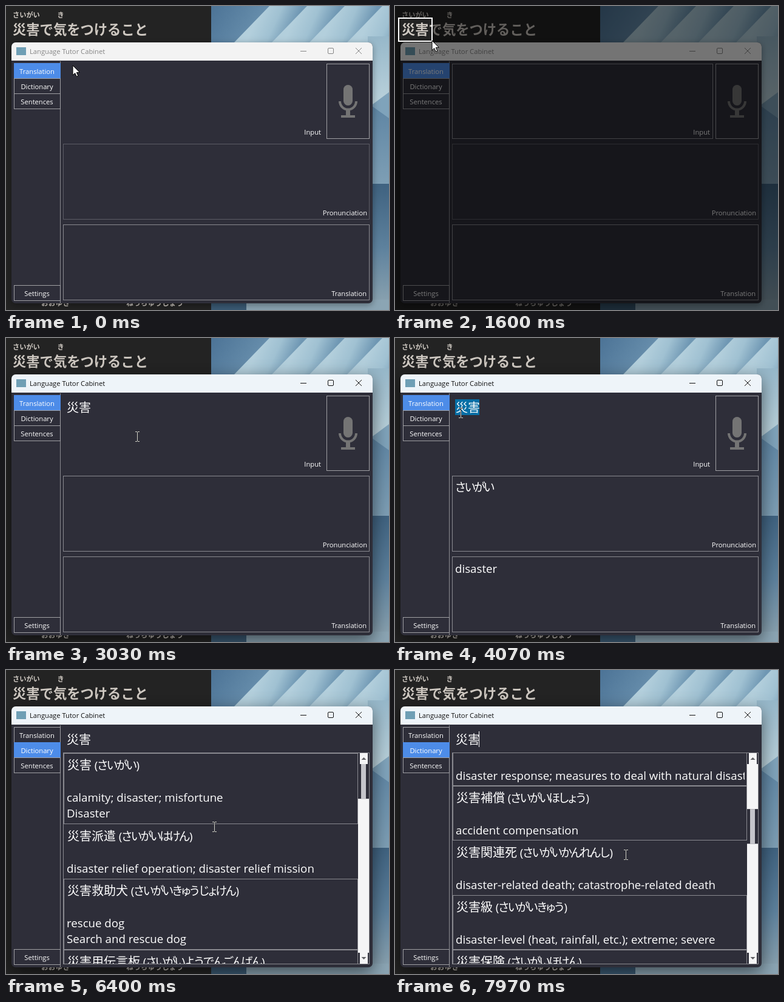
These frames come from a looping animation (631x501 px, 8000 ms). An HTML page with a canvas:

```html
<!DOCTYPE html>
<html lang="ja">
<head>
<meta charset="utf-8">
<style>
html, body { margin: 0; width: 100%; height: 100%; overflow: hidden; background: #222; }
canvas { display: block; }
</style>
</head>
<body>
<canvas id="stage" width="631" height="501"></canvas>
<script>
const ctx = document.getElementById('stage').getContext('2d');
const LOOP = 8000;
const LATIN = '"Open Sans", "Noto Sans", sans-serif';
const CJK = '"Noto Sans CJK JP", "Noto Sans CJK", sans-serif';
const PANEL = '#2e2e39', LINE = '#8a8a90', WHITE = '#fff', MIC = '#747474';

// Moments, in ms, at which the state changes
const CUE = {
  dim: 300, drag: 1130, capture: 1870, hover: 2040, activate: 2930, select: 3920,
  result: 3300, dictionary: 4880, focus: 5640, paste: 5840, list: 6000, nudge: 7320, scroll: 7630,
};

const ENTRIES = [
  ['災害 (さいがい)', 'calamity; disaster; misfortune', 'Disaster'],
  ['災害派遣 (さいがいはけん)', 'disaster relief operation; disaster relief mission'],
  ['災害救助犬 (さいがいきゅうじょけん)', 'rescue dog', 'Search and rescue dog'],
  ['災害用伝言板 (さいがいようでんごんばん)', 'emergency message board; disaster message board; computer board'],
  ['災害対応 (さいがいたいおう)', 'disaster response; measures to deal with natural disasters'],
  ['災害補償 (さいがいほしょう)', 'accident compensation'],
  ['災害関連死 (さいがいかんれんし)', 'disaster-related death; catastrophe-related death'],
  ['災害級 (さいがいきゅう)', 'disaster-level (heat, rainfall, etc.); extreme; severe'],
  ['災害保険 (さいがいほけん)', 'accident insurance'],
];

const INPUT = [94, 95, 430, 124];
const SEARCH = [94, 95, 505, 37];
const LIST = [95, 137, 485, 347];
const LIST_EXTENT = 1887, NOTCH = 50;

// Pointer gestures: start, end, destination
const MOVES = [
  { from: 100, to: 670, x: 12, y: 23 },
  { from: 1030, to: CUE.drag, x: 6, y: 20 },
  { from: CUE.drag, to: 1600, x: 61, y: 57 },
  { from: 1845, to: 2370, x: 216, y: 162 },
  { from: 3400, to: CUE.select, x: 142, y: 118 },
  { from: CUE.select, to: 4070, x: 108, y: 123 },
  { from: 4300, to: CUE.dictionary, x: 50, y: 132 },
  { from: 5000, to: 5330, x: 216, y: 162 },
  { from: 5400, to: CUE.focus, x: 216, y: 113 },
  { from: 6200, to: 6730, x: 383, y: 304 },
  { from: 6900, to: 7300, x: 383, y: 310 },
  { from: CUE.scroll, to: 7970, x: 380, y: 304 },
];

const easeOut = u => 1 - (1 - u) ** 3;

function pointerAt(t) {
  let x = 110, y = 98;
  for (const move of MOVES) {
    const u = easeOut(Math.min(1, Math.max(0, (t - move.from) / (move.to - move.from))));
    x += (move.x - x) * u;
    y += (move.y - y) * u;
  }
  return { x: Math.round(x), y: Math.round(y) };
}

function scrollAt(t) {
  if (t < CUE.nudge) return 0;
  const turns = Math.floor((t - CUE.scroll) / 48) + 1;
  return NOTCH * (1 + Math.min(8, Math.max(0, turns)));
}

const inside = (p, [x, y, w, h]) => p.x >= x && p.x < x + w && p.y >= y && p.y < y + h;

function fill(color, x, y, w, h) {
  ctx.fillStyle = color;
  ctx.fillRect(x, y, w, h);
}

function frame([x, y, w, h], color = LINE) {
  ctx.strokeStyle = color;
  ctx.lineWidth = 1;
  ctx.strokeRect(x + .5, y + .5, w - 1, h - 1);
}

function rounded(color, x, y, w, h, r) {
  ctx.beginPath();
  ctx.roundRect(x, y, w, h, r);
  ctx.fillStyle = color;
  ctx.fill();
}

function poly(color, ...pts) {
  ctx.beginPath();
  for (let i = 0; i < pts.length; i += 2) ctx.lineTo(pts[i], pts[i + 1]);
  ctx.closePath();
  ctx.fillStyle = color;
  ctx.fill();
}

function line(x0, y0, x1, y1) {
  ctx.beginPath();
  ctx.moveTo(x0, y0);
  ctx.lineTo(x1, y1);
  ctx.stroke();
}

function gradient(x0, y0, x1, y1, ...colors) {
  const g = ctx.createLinearGradient(x0, y0, x1, y1);
  colors.forEach((c, i) => g.addColorStop(i / (colors.length - 1), c));
  return g;
}

function clip([x, y, w, h], paint) {
  ctx.save();
  ctx.beginPath();
  ctx.rect(x, y, w, h);
  ctx.clip();
  paint();
  ctx.restore();
}

function label(text, x, y, color = WHITE, align = 'left', font = '11.2px ' + LATIN) {
  ctx.font = font;
  ctx.fillStyle = color;
  ctx.textAlign = align;
  ctx.fillText(text, x, y);
}

// Large text mixing Latin, kanji and tightly set kana
function mixed(text, x, y, color = WHITE) {
  for (const run of text.match(/[ぁ-ん]|[一-龠]+|[^ぁ-ん一-龠]+/g)) {
    const kana = /[ぁ-ん]/.test(run), kanji = /[一-龠]/.test(run);
    const trim = !kana ? 0 : /[っゃゅょ]/.test(run) ? 6.6 : 3.2;
    const font = kana ? '19px ' + CJK : kanji ? '20px ' + CJK : '18.7px ' + LATIN;
    label(run, x - trim / 2, y, color, 'left', font);
    x += ctx.measureText(run).width - trim;
  }
}

function drawDesktop() {
  fill(gradient(338, 0, 430, 60, '#4c7396', '#7097b3'), 338, 0, 293, 60);
  for (let i = 0; i < 4; i++) {
    const x = 434 + 62 * i;
    const tone = gradient(x - 25, 30, x + 30, 55, '#b3cfdc', '#a0c1d2', '#6f97b3');
    poly(tone, x, 0, x + 80, 0, x + 22, 60, x - 58, 60);
  }
  const side = 596, width = 35;
  fill(gradient(0, 40, 0, 165, '#93b5c8', '#bcd3dc'), side, 50, width, 115);
  fill(gradient(0, 160, 0, 293, '#5d84a3', '#7e9fb5'), side, 165, width, 128);
  poly('#7fa3bb', side, 168, 631, 142, 631, 185, side, 160);
  fill(gradient(0, 293, 0, 501, '#3f6280', '#5d819d', '#8fa6b2'), side, 293, width, 208);
  fill('#3a5a74', 338, 484, 58, 17);
  fill('#8ba5b4', 396, 484, 235, 17);

  fill('#232323', 0, 0, 338, 501);
  const ink = '#cec8c1', bold = size => `bold ${size}px ${CJK}`;
  label('さいがい', 11, 19, ink, 'left', bold(11.2));
  label('き', 90, 19, ink, 'center', bold(11.2));
  label('災害で気をつけること', 11, 47, ink, 'left', bold(22.3));
  label('おおゆき', 58, 494, ink, 'left', bold(11.8));
  label('ねっちゅうしょう', 198, 494, ink, 'left', bold(11.8));
}

function drawTitleBar(active) {
  rounded(active ? '#eef4f9' : '#f3f3f3', 9, 60, 595, 30, [7, 7, 0, 0]);
  fill('#6f9fb5', 17, 68, 16, 13);
  const ink = active ? '#111' : '#858585';
  label('Language Tutor Cabinet', 39, 79, ink);
  ctx.strokeStyle = ink;
  ctx.lineWidth = 1;
  line(485, 74.5, 495, 74.5);
  line(576, 69, 586, 79);
  line(586, 69, 576, 79);
  ctx.beginPath();
  ctx.roundRect(530.5, 69.5, 9, 9, 1.5);
  ctx.stroke();
}

function drawTab(name, y, selected) {
  const box = [13, y, 77, 26];
  if (selected) fill('#4d8ce8', ...box);
  else frame(box, '#a0a0a4');
  label(name, 51, y + 18, WHITE, 'center');
}

function drawWindow(active, page) {
  ctx.save();
  ctx.shadowColor = active ? 'rgba(0,0,0,.55)' : 'rgba(0,0,0,.35)';
  ctx.shadowBlur = active ? 28 : 12;
  ctx.shadowOffsetY = active ? 8 : 3;
  rounded(PANEL, 9, 60, 595, 430, 7);
  ctx.restore();
  drawTitleBar(active);
  ctx.strokeStyle = LINE;
  line(89.5, 91, 89.5, 490);
  ['Translation', 'Dictionary', 'Sentences'].forEach((name, i) => drawTab(name, 94 + 25 * i, i === page));
  drawTab('Settings', 460, false);
}

function drawMic() {
  rounded(MIC, 556, 130, 15, 34, 7.5);
  ctx.strokeStyle = MIC;
  ctx.lineWidth = 4;
  ctx.beginPath();
  ctx.arc(563.5, 157, 13.5, Math.PI, 0, true);
  ctx.stroke();
  fill(MIC, 560, 170, 7, 11);
  fill(MIC, 552, 180, 23, 4);
}

function drawTranslation(t, mouse, active) {
  const captured = t < CUE.dim || t >= CUE.hover;
  if (!(captured && inside(mouse, INPUT))) frame(INPUT);
  frame([528, 95, 71, 124], '#a0a0a4');
  drawMic();
  frame([94, 227, 505, 125], active ? LINE : '#5c5c65');
  frame([94, 360, 505, 125]);
  if (t >= CUE.select) {
    const left = t > 4070 || mouse.x < 110 ? 99 : mouse.x < 130 ? 119 : 139;
    fill('#066fa6', left, 101, 139 - left, 26);
  }
  if (active) mixed('災害', 100, 122);
  if (t >= CUE.result) {
    mixed('さいがい', 100, 253);
    mixed('disaster', 99, 387);
  }
  label('Input', 519, 212, WHITE, 'right');
  label('Pronunciation', 595, 345, WHITE, 'right');
  label('Translation', 594, 478, WHITE, 'right');
}

function drawScrollbar(offset) {
  const [, top, , height] = LIST, end = top + height, button = 18;
  const scale = (height - 2 * button) / LIST_EXTENT;
  const y = top + button + offset * scale, thumbEnd = y + height * scale;
  const track = '#f5f5f6', arrow = '#606064';
  fill(PANEL, 580, top, 18, height);
  fill(track, 583, top, 13, button);
  fill(track, 583, end - button, 13, button);
  fill(track, 580, top + button, 18, y - top - button);
  fill(track, 580, thumbEnd, 18, end - button - thumbEnd);
  fill('#c5c5ca', 585, y, 8, thumbEnd - y);
  poly(arrow, 585.5, top + 11, 593.5, top + 11, 589.5, top + 7);
  poly(arrow, 585.5, end - 11, 593.5, end - 11, 589.5, end - 7);
}

function drawList(t, mouse) {
  const [left, listTop, width, height] = LIST;
  const offset = scrollAt(t);
  // The highlight follows the first wheel notch a moment late
  const hoverY = mouse.y - listTop + scrollAt(t < CUE.scroll ? t - 80 : t);
  let top = 0;
  clip(LIST, () => {
    for (const [title, ...senses] of ENTRIES) {
      const y = listTop + top - offset;
      const h = senses.length > 1 ? 117 : 90;
      const hovered = inside(mouse, LIST) && hoverY >= top && hoverY < top + h;
      if (!hovered) frame([left, y, width, h]);
      clip([left, y, width - 4, h], () => {
        mixed(title, 101, y + 27);
        senses.forEach((sense, i) => mixed(sense, 100, y + 80 + 26 * i));
      });
      top += h;
    }
  });
  drawScrollbar(offset);
}

function drawDictionary(t, mouse) {
  const pasted = t >= CUE.paste;
  if (!inside(mouse, SEARCH) && t < CUE.focus) frame(SEARCH);
  frame([94, 136, 505, 349]);
  if (pasted) mixed('災害', 100, 122);
  else mixed('Enter search here', 100, 122, '#8b8b92');
  const blinkOn = Math.floor((t - CUE.paste) / 532) % 2 === 0;
  if (pasted && blinkOn) fill(WHITE, 138, 101, 1, 26);
  if (t >= CUE.list) drawList(t, mouse);
}

function drawDim(dragging, mouse) {
  const crop = [6, 20, mouse.x - 6, mouse.y - 19];
  ctx.beginPath();
  ctx.rect(0, 0, 631, 501);
  if (dragging) ctx.rect(...crop);
  ctx.fillStyle = `rgba(0,0,0,${dragging ? .52 : .28})`;
  ctx.fill('evenodd');
  if (!dragging) return;
  ctx.strokeStyle = WHITE;
  ctx.lineWidth = 2;
  ctx.strokeRect(...crop);
}

function drawPointer({ x, y }, beam) {
  ctx.save();
  ctx.translate(x, y);
  if (beam) {
    ctx.globalCompositeOperation = 'difference';
    fill(WHITE, 0, -7, 1, 15);
    for (const serif of [-8, 8]) {
      fill(WHITE, -3, serif, 3, 1);
      fill(WHITE, 1, serif, 3, 1);
    }
  } else {
    poly(WHITE, 0, 0, 0, 16, 3.7, 12.6, 6.3, 18.2, 8.8, 17.1, 6.3, 11.6, 11.3, 11.3);
    ctx.strokeStyle = '#000';
    ctx.lineWidth = 1;
    ctx.stroke();
  }
  ctx.restore();
}

function draw(t) {
  const mouse = pointerAt(t);
  const active = t >= CUE.activate, dictionary = t >= CUE.dictionary;
  drawDesktop();
  drawWindow(active, dictionary ? 1 : 0);
  if (dictionary) drawDictionary(t, mouse);
  else drawTranslation(t, mouse, active);
  if (t >= CUE.dim && t < CUE.capture) drawDim(t >= CUE.drag, mouse);
  const overText = dictionary
    ? inside(mouse, SEARCH) || (t >= CUE.list && inside(mouse, LIST))
    : inside(mouse, INPUT);
  drawPointer(mouse, active && overText);
}

const start = performance.now();
function tick() {
  draw((performance.now() - start) % LOOP);
  requestAnimationFrame(tick);
}
tick();
</script>
</body>
</html>
```
